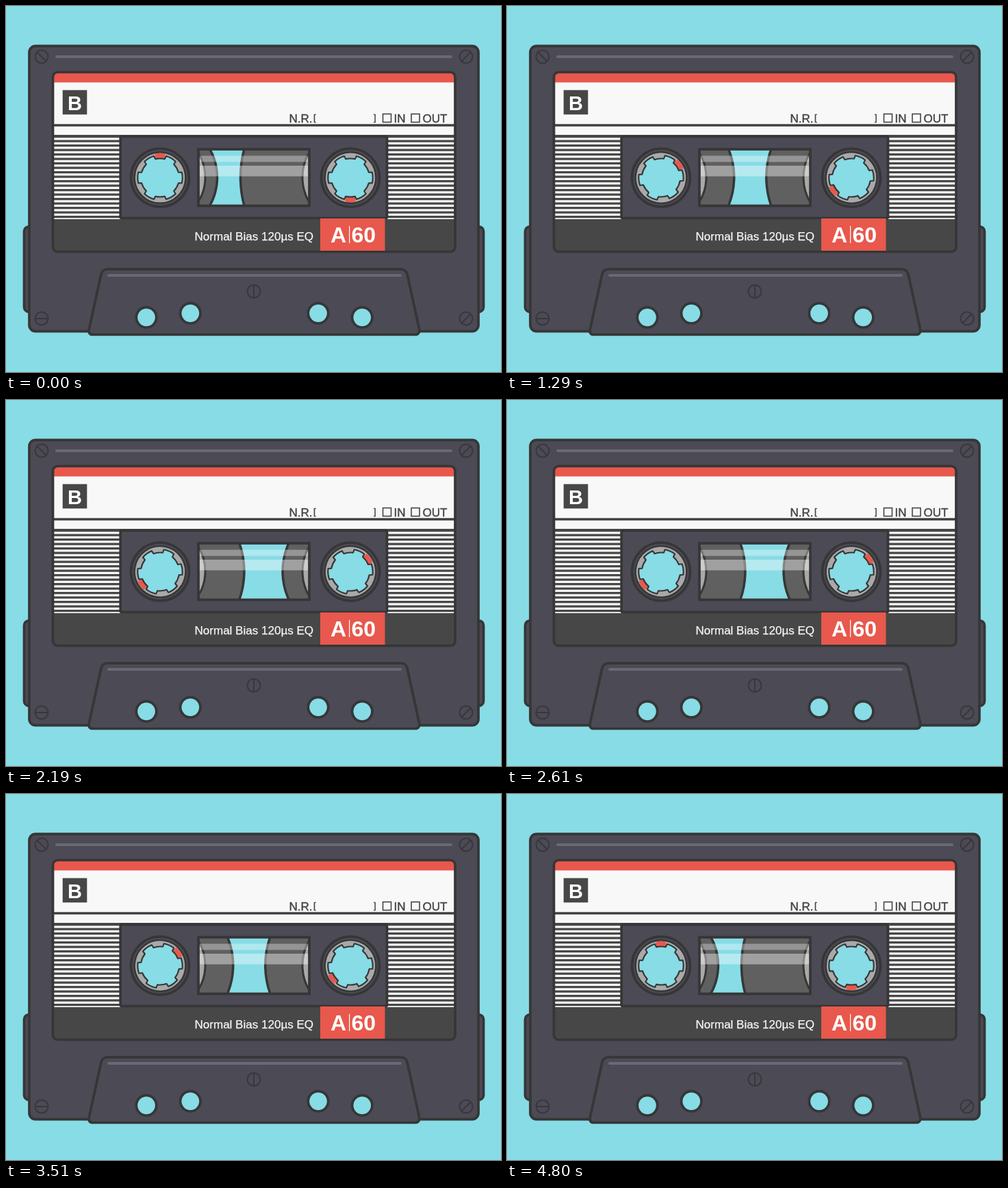
Recreate the animation shown at these times as an HTML page. Size 723 px wide and 534 px high, loop 4830 ms.

```html
<!DOCTYPE html>
<html lang="en">
<head>
<meta charset="utf-8">
<title>Cassette</title>
<style>
  html, body { margin: 0; width: 100%; height: 100%; overflow: hidden; background: #87dce6; }
  svg { display: block; width: 723px; height: 534px; }
  text { font-family: "Liberation Sans", Arial, sans-serif; }
  .line { stroke: #363636; stroke-width: 3.7; stroke-linejoin: round; }
  .body { fill: #4b4a55; }
  .sky { fill: #87dce6; }
  .dark { fill: #474747; }
  .red { fill: #e8584c; }
  .white { fill: #f8f8f8; }
  .tape { fill: #606060; stroke-width: 3.5; }
  .hub { fill: #a9a9a9; }
  .shine { stroke: #696874; stroke-width: 4; stroke-linecap: round; }
  .screw { fill: none; stroke: #38383c; stroke-width: 2; }
  .small { font-size: 17px; fill: #444; stroke: #444; stroke-width: .45; }
  .small .bracket { font-size: 13px; }
  .box { fill: none; stroke: #444; stroke-width: 1.6; }
  .bold { font-weight: bold; fill: #fff; }
</style>
</head>
<body>
<svg viewBox="0 0 723 534">
  <defs>
    <clipPath id="pane"><rect x="281" y="209" width="162" height="82"/></clipPath>
    <clipPath id="card"><rect x="68.5" y="97" width="587.5" height="261" rx="6"/></clipPath>
    <g id="reel">
      <circle r="37.3" class="hub line" style="stroke-width:2.4"/>
      <path id="mark" class="red"/>
      <path id="gear" class="sky line" style="stroke-width:2.1"/>
    </g>
  </defs>

  <rect class="sky" width="723" height="534"/>
  <rect class="body line" x="26.5" y="321.8" width="671" height="124.5" rx="7"/>
  <rect class="body line" x="34" y="58.4" width="656" height="416.2" rx="9"/>
  <path class="shine" d="M74 74H650"/>
  <g id="screws" class="screw"></g>

  <g clip-path="url(#card)">
    <rect class="white" x="68" y="97" width="589" height="262"/>
    <rect class="red" x="68" y="97" width="589" height="14.5"/>
    <rect x="68" y="172.3" width="589" height="3.4" fill="#3e3e3e"/>
    <rect class="dark" x="68" y="188" width="589" height="171"/>
    <path id="stripes" stroke="#f8f8f8" stroke-width="3.1"/>
    <rect class="dark" x="68" y="311" width="589" height="48"/>
  </g>
  <rect class="line" fill="none" x="68.5" y="96.5" width="587.5" height="262" rx="7"/>

  <rect class="dark" x="82.7" y="122.7" width="35.6" height="35.6"/>
  <text class="bold" x="100.5" y="151.5" font-size="29" text-anchor="middle">B</text>
  <g class="small">
    <text x="413.5" y="169.5">N.R.</text>
    <text class="bracket" x="449" y="166.8">[</text>
    <text class="bracket" x="537" y="166.8">]</text>
    <text x="566.5" y="169.5">IN</text>
    <text x="608.5" y="169.5">OUT</text>
  </g>
  <rect class="box" x="550.5" y="157.5" width="12" height="12"/>
  <rect class="box" x="592" y="157.5" width="12" height="12"/>
  <text x="275.5" y="342" font-size="17.050" fill="#f8f8f8" stroke="#f8f8f8" stroke-width=".25">Normal Bias 120µs EQ</text>

  <rect class="body line" x="167.2" y="190.500" width="389.300" height="119" rx="2"/>
  <rect class="red" x="459" y="310" width="94.500" height="47"/>
  <g class="bold" font-size="32">
    <text x="474" y="345">A</text>
    <text x="504.5" y="345">60</text>
    <rect x="501" y="321" width="1.2" height="25"/>
  </g>

  <g clip-path="url(#pane)">
    <rect class="sky" x="281" y="209" width="162" height="82"/>
    <circle id="rollR" class="tape line" cx="503" cy="250"/>
    <circle id="rollL" class="tape line" cx="225" cy="250"/>
    <circle class="hub line" cx="225" cy="250" r="66" style="stroke-width:3"/>
    <circle class="hub line" cx="503" cy="250" r="70" style="stroke-width:3"/>
    <g fill="#fff">
      <rect x="281" y="218.5" width="162" height="9" opacity=".33"/>
      <rect x="281" y="233" width="162" height="15.5" opacity=".4"/>
    </g>
  </g>
  <rect class="line" fill="none" x="281" y="209" width="162" height="82.5" style="stroke-linejoin:miter"/>

  <circle class="body line" cx="225" cy="250.5" r="42.5"/>
  <circle class="body line" cx="503" cy="250.5" r="42.5"/>
  <use id="reelL" href="#reel"/>
  <use id="reelR" href="#reel"/>

  <path class="body line" d="M149 384H576Q584 384 586 391L603.5 471Q605 479.5 597 479.5H127Q119.5 479.5 121.5 471L139 391Q141 384 149 384Z"/>
  <path class="shine" d="M150 393H576"/>
  <g class="screw"><circle cx="362" cy="416.5" r="9.5"/><path d="M362 407V426"/></g>
  <g class="sky line">
    <circle cx="205" cy="454.3" r="14.7"/>
    <circle cx="269.3" cy="448.3" r="14.7"/>
    <circle cx="456" cy="448.3" r="14.7"/>
    <circle cx="520.2" cy="454.3" r="14.7"/>
  </g>
</svg>
<script>
  const $ = id => document.getElementById(id);
  const LOOP = 4830, TURN = 2400, STEP = 30, SPIN = 600;

  // Point at radius r, angle in degrees clockwise from the top
  const polar = (r, deg) => {
    const a = deg * Math.PI / 180;
    return (r * Math.sin(a)).toFixed(2) + ' ' + (-r * Math.cos(a)).toFixed(2);
  };

  let gear = '';
  for (let a = 0; a < 360; a += 60) {
    gear += `${a ? 'L' : 'M'}${polar(28, a - 14)}A28 28 0 0 1 ${polar(28, a + 14)}` +
            `L${polar(32.7, a + 16)}A32.7 32.7 0 0 1 ${polar(32.7, a + 44)}`;
  }
  $('gear').setAttribute('d', gear + 'Z');
  $('mark').setAttribute('d',
    `M${polar(28, -14)}L${polar(35.8, -12)}A35.8 35.8 0 0 1 ${polar(35.8, 12)}L${polar(28, 14)}Z`);

  let stripes = '';
  for (let i = 0; i < 19; i++) stripes += `M68 ${(193.9 + i * 6.5).toFixed(1)}H657`;
  $('stripes').setAttribute('d', stripes);

  $('screws').innerHTML = [[52, 74, 45], [672, 74, -45], [52, 456, 0], [672, 456, -45]]
    .map(([x, y, a]) =>
      `<g transform="translate(${x} ${y}) rotate(${a})"><circle r="9.5"/><path d="M-9.5 0H9.5"/></g>`)
    .join('');

  const place = (id, x, deg) =>
    $(id).setAttribute('transform', `translate(${x} 250.5) rotate(${deg})`);

  // The tape winds onto the left reel, then runs back
  function draw(now) {
    const t = Math.floor(now % LOOP / STEP) * STEP;
    const u = t <= TURN ? t : Math.max(0, 2 * TURN - t);
    const turn = u / SPIN * 360;
    place('reelL', 225, turn);
    place('reelR', 503, turn + 180);
    $('rollL').setAttribute('r', 83.5 + u * 0.018);
    $('rollR').setAttribute('r', 160.5 - u * 0.0281);
  }

  const start = performance.now();
  function tick() {
    draw(performance.now() - start);
    requestAnimationFrame(tick);
  }
  tick();
</script>
</body>
</html>
```
